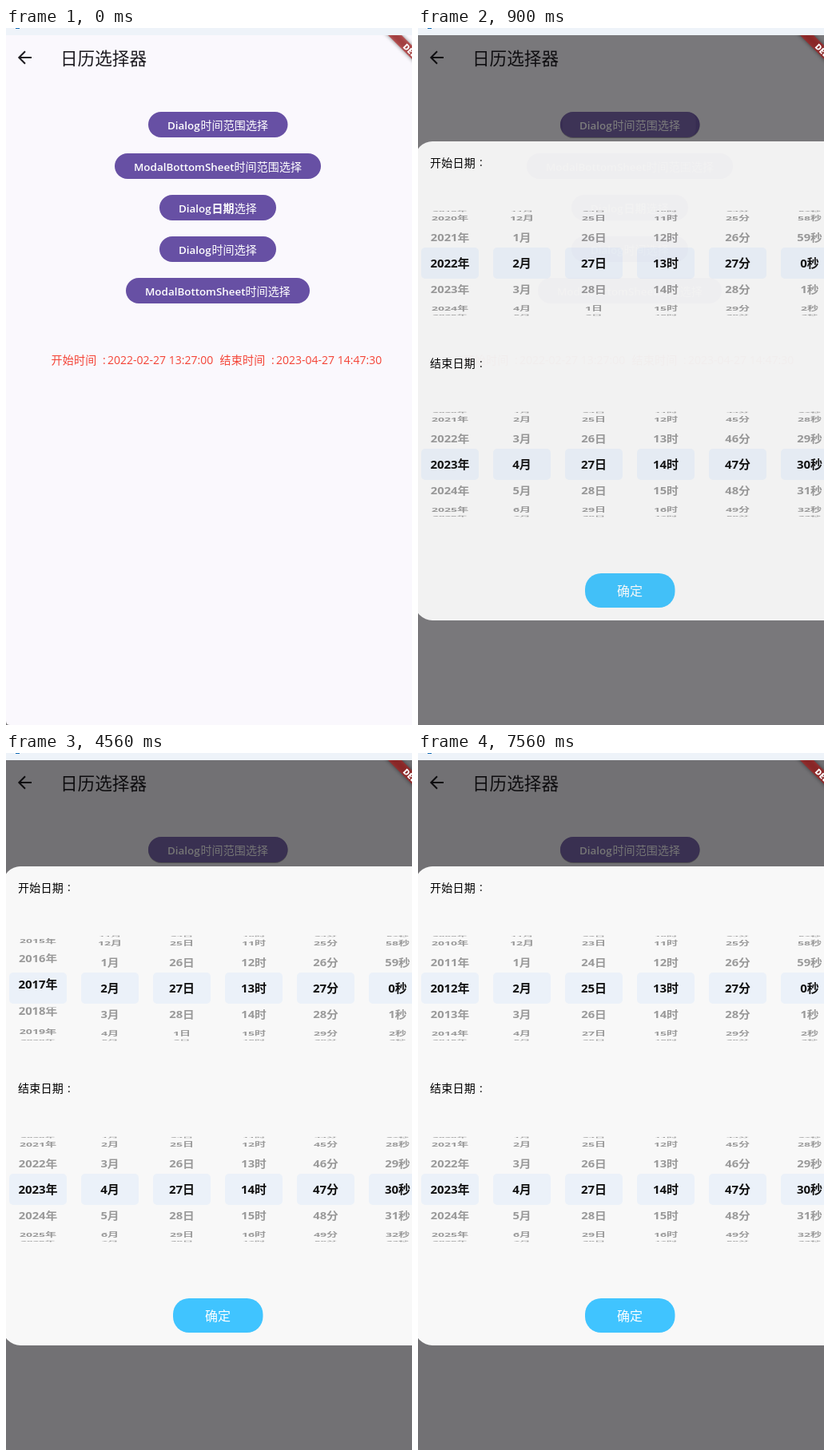
An HTML page that plays this animation: 508 by 873 pixels, repeating every 8000 ms.

```html
<!DOCTYPE html>
<html lang="zh-CN">
<head>
<meta charset="utf-8">
<style>
  html, body { margin: 0; width: 100%; height: 100%; overflow: hidden; background: #faf8fd; }
  svg { display: block; width: 100vw; height: 100vh; }
  text { font: 14px "Open Sans", "Noto Sans CJK SC", "Noto Sans CJK", sans-serif; white-space: pre; }
  .title { font-size: 21.6px; font-weight: 300; }
  .latin { font-size: 13.4px; font-weight: 600; }
  .bold { font-weight: 700; }
  .cjk { letter-spacing: .1px; }
  .label { letter-spacing: .25px; }
  .ok { font-size: 16px; }
  .wheel text { font-size: 15px; font-weight: 700; text-anchor: middle; }
</style>
</head>
<body>
<svg viewBox="0 0 508 873" preserveAspectRatio="none">
  <defs>
    <clipPath id="band"><path d="M0 271h508v47.5H0zM0 523h508v47.5H0z"/></clipPath>
    <clipPath id="sides"><path d="M0 227.5h508V271H0zM0 318.5h508V361H0zM0 479.5h508V523H0zM0 570.5h508V613H0z"/></clipPath>
    <clipPath id="app"><path d="M0 9h508v864H0z"/></clipPath>
    <filter id="blur" x="-50%" y="-50%" width="200%" height="200%"><feGaussianBlur stdDeviation="2.5"/></filter>
  </defs>
  <rect width="508" height="873" fill="#faf8fd"/>
  <path d="M32 37H17M24 29.3L16.3 37l7.7 7.7" fill="none" stroke="#1d1b20" stroke-width="2"/>
  <text class="title" x="68" y="45.5" fill="#1d1b20">日历选择器</text>
  <rect id="shadow" x="178" y="106" width="174.5" height="32" rx="16" opacity="0"/>
  <g id="buttons"></g>
  <g id="glow" fill="#fff">
    <rect x="178" y="105" width="174.5" height="32" rx="16" opacity=".07"/>
    <rect id="splash" y="105" height="32" opacity=".08"/>
  </g>
  <g fill="#f44336">
    <text class="label" x="56.5" y="421">开始时间</text><text x="121" y="421">:</text>
    <text x="127" y="421">2022-02-27 13:27:00</text>
    <text class="label" x="267.5" y="421">结束时间</text><text x="332" y="421">:</text>
    <text x="338" y="421">2023-04-27 14:47:30</text>
  </g>
  <rect id="barrier" y="9" width="508" height="864"/>
  <g id="dialog">
    <rect x="-4" y="142" width="540" height="600" rx="22" fill="#f8f8f8"/>
    <text class="label" x="15" y="173.5">开始日期</text><text x="77" y="173">:</text>
    <text class="label" x="15" y="425">结束日期</text><text x="77" y="424.5">:</text>
    <g id="slots" fill="#ebf1f9"></g>
    <g class="wheel" id="dim" fill="#999" clip-path="url(#sides)"></g>
    <g class="wheel" id="lit" fill="#111" clip-path="url(#band)"></g>
    <rect x="209" y="683" width="112.5" height="43" rx="20" fill="#40c4ff"/>
    <text class="ok" x="249" y="711" fill="#fff">确定</text>
  </g>
  <g clip-path="url(#app)">
    <path d="M470 1h17l43 43v17z" opacity=".5" filter="url(#blur)"/>
    <path d="M470 1h17l43 43v17z" fill="#b71c1c" fill-opacity=".63"/>
    <text transform="translate(496 24) rotate(45)" fill="#fff" style="font-size:10.2px;font-weight:800">DEBUG</text>
  </g>
  <rect width="508" height="9" fill="#eef3f9"/>
  <rect x="12" width="5" height="1" fill="#0a6ab5"/>
  <path d="M0 868q0 5 5 5H0z" fill="#777"/>
</svg>
<script>
const $ = id => document.getElementById(id);
const LOOP = 8000, STEP = 30, RADIUS = 66;
const CENTERS = [294.6, 546.6];
const columnX = c => 40 + 90 * c;
const mod = (a, n) => ((a % n) + n) % n;
const clamp = x => Math.max(0, Math.min(1, x));
const easeOut = x => 1 - (1 - x) ** 2;

const buttons = [
  [178, 174.5, 'Dialog', '时间范围选择', 243.5],
  [136, 258, 'ModalBottomSheet', '时间范围选择', 285.5],
  [192, 146, 'Dialog', '<tspan class="bold">日期</tspan>选择', 257.5],
  [192, 146, 'Dialog', '时间选择', 257.5],
  [150, 230, 'ModalBottomSheet', '时间选择', 299.5]
];
$('buttons').innerHTML = buttons.map(([x, w, latin, cjk, cx], i) => {
  const y = 105 + 52 * i;
  return `<rect x="${x}" y="${y}" width="${w}" height="32" rx="16" fill="#6750a4"/>
    <g fill="#fff"><text class="latin" x="${x + 24}" y="${y + 21.5}">${latin}</text>
    <text class="cjk" x="${i === 2 ? cx : cx}" y="${y + 21.7}">${cjk}</text></g>`;
}).join('');

$('slots').innerHTML = CENTERS.map(cy => [0, 1, 2, 3, 4, 5].map(c =>
  `<rect x="${columnX(c) - 36}" y="${cy - 19.6}" width="72" height="39" rx="5"/>`).join('')).join('');

// Each column: unit, first value, number of values
const columns = days => [
  ['年', 1925, 120], ['月', 1, 12], ['日', 1, days],
  ['时', 0, 24], ['分', 0, 60], ['秒', 0, 60]
];

function drawColumn(x, cy, [unit, first, count], value, out) {
  for (let i = Math.ceil(value - 3); i <= value + 3; i++) {
    const off = i - value, angle = off * Math.PI / 6;
    const cos = Math.cos(angle), dy = Math.sin(angle) * (RADIUS - 0.8);
    const label = first + mod(i - first, count) + unit;
    const item = y => `<text y="5.5" transform="translate(${x} ${y.toFixed(2)}) scale(${
      (1 - 0.12 * (1 - cos)).toFixed(3)} ${Math.max(cos, 0.1).toFixed(3)})">${label}</text>`;
    out.dim += item(cy + dy);
    if (Math.abs(off) < 0.9) out.lit += item(cy + dy * 1.1);
  }
}

function yearAt(t) {
  if (t < 3870) return 2022;
  if (t < 3900) return 2019.5;
  if (t < 4560) return 2019;
  return 2019 - 7 * easeOut(clamp((t - 4530) / 210));
}

function dayAt(t) {
  return t < 7200 ? 27 : 24.5 + 0.5 * easeOut(clamp((t - 7200) / 360));
}

function drawWheels(t) {
  const blank = [1925, 1, 1, 0, 0, 0], opening = t < 870;
  const year = yearAt(t), leap = Math.round(year) % 4 === 0;
  const starts = opening ? blank : [year, 2, dayAt(t), 13, 27, 0];
  const ends = opening ? blank : [2023, 4, 27, 14, 47, 30];
  const out = { dim: '', lit: '' };
  [[starts, leap ? 29 : 28], [ends, 30]].forEach(([values, days], w) =>
    columns(days).forEach((col, c) => drawColumn(columnX(c), CENTERS[w], col, values[c], out)));
  $('dim').innerHTML = out.dim;
  $('lit').innerHTML = out.lit;
}

function render(t) {
  const open = t >= 840;
  const shown = open ? 0.92 + 0.08 * clamp((t - 840) / 150) : 0;
  const spread = clamp((t - 840) / 90);
  $('shadow').setAttribute('opacity', 0.3 * clamp((t - 180) / 90));
  $('glow').setAttribute('visibility', open ? 'visible' : 'hidden');
  $('splash').setAttribute('x', 186 - 8 * spread);
  $('splash').setAttribute('width', 152 + 22.5 * spread);
  $('splash').setAttribute('rx', 16 * spread);
  $('barrier').setAttribute('opacity', 0.54 * shown);
  $('dialog').setAttribute('opacity', shown);
  $('dialog').setAttribute('visibility', open ? 'visible' : 'hidden');
  if (open) drawWheels(t);
}

const begin = performance.now();
let last = -1;
function tick() {
  const t = Math.floor(mod(performance.now() - begin, LOOP) / STEP) * STEP;
  if (t !== last) render(last = t);
  requestAnimationFrame(tick);
}
tick();
</script>
</body>
</html>
```
